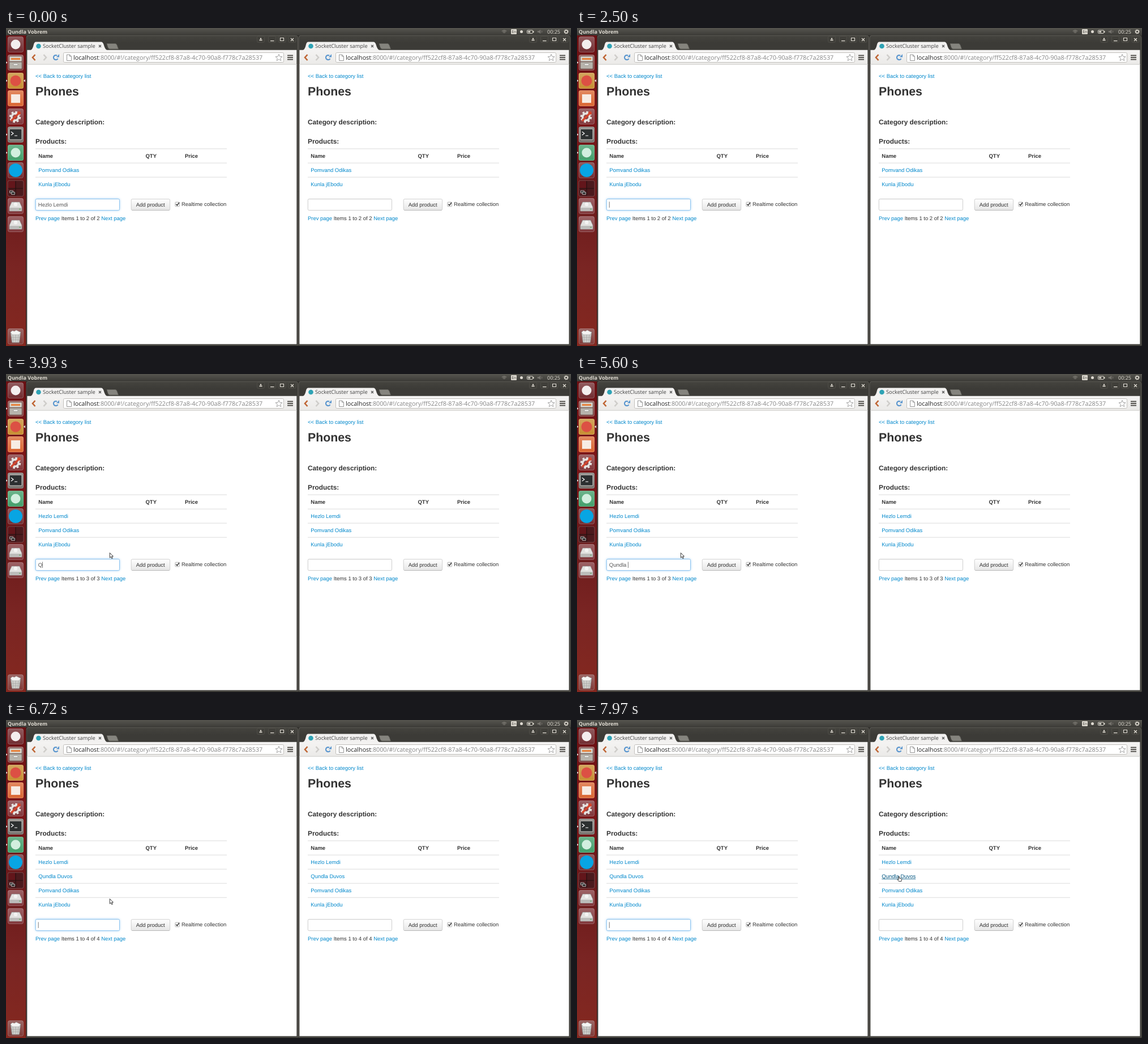
Write an HTML page with a canvas that moves like this. It is 998 px wide and 561 px high and loops after 8 s.

```html
<!DOCTYPE html>
<html lang="en">
<head>
<meta charset="utf-8">
<title>Realtime product list</title>
<style>
  html, body { margin: 0; width: 100%; height: 100%; overflow: hidden; background: #2f2e2a; }
  canvas { display: block; }
</style>
</head>
<body>
<canvas width="998" height="561"></canvas>
<script>
const ctx = document.querySelector('canvas').getContext('2d');
const LOOP = 8000, ROW = 25, BODY = 9.46;
const SANS = '"Liberation Sans", Arial, sans-serif';
const UI = '"Open Sans", "Noto Sans", sans-serif';
const LINK = '#0088cc', INK = '#333';
const FIRST = 'Hezlo Lemdi', SECOND = 'Qundla Duvos';
const BASE = ['Pomvand Odikas', 'Kunla jEbodu'];

// [time, text in the field]
const TYPING = [
  [0, FIRST], [2500, ''], [3930, 'Q'], [4100, 'Qu'], [4240, 'Qun'], [4410, 'Qunn'],
  [4840, 'Qun'], [4950, 'Qund'], [5060, 'Qundl'], [5160, 'Qundla'], [5600, 'Qundla '],
  [6010, 'Qundla D'], [6150, 'Qundla Du'], [6300, 'Qundla Duv'], [6390, 'Qundla Duvo'],
  [6480, SECOND], [6660, '']
];
const CARET_TOGGLES = [260, 860, 1450, 2050, 2500, 3130, 3730, 7260, 7860];
// [time, x, y]
const POINTER = [[2560, 183, 315], [7118, 183, 315], [7370, 416, 289.5],
                 [7496, 507, 279], [7622, 507, 279], [7958, 568, 276.5]];

function text(str, x, y, { size = BODY, color = INK, weight = '', family = SANS } = {}) {
  ctx.font = `${weight} ${size}px ${family}`;
  ctx.fillStyle = color;
  ctx.fillText(str, x, y);
  return x + ctx.measureText(str).width;
}
function rect(x, y, w, h, fill) {
  ctx.fillStyle = fill;
  ctx.fillRect(x, y, w, h);
}
function paint(fill, stroke, width = 1) {
  if (fill) { ctx.fillStyle = fill; ctx.fill(); }
  if (stroke) { ctx.strokeStyle = stroke; ctx.lineWidth = width; ctx.stroke(); }
}
function box(x, y, w, h, r, fill, stroke, width) {
  ctx.beginPath();
  ctx.roundRect(x, y, w, h, r);
  paint(fill, stroke, width);
}
function disc(x, y, r, fill, stroke, width) {
  ctx.beginPath();
  ctx.arc(x, y, r, 0, 7);
  paint(fill, stroke, width);
}
function path(d, fill, stroke, width, x = 0, y = 0) {
  ctx.save();
  ctx.translate(x, y);
  const p = new Path2D(d);
  if (fill) { ctx.fillStyle = fill; ctx.fill(p); }
  if (stroke) { ctx.strokeStyle = stroke; ctx.lineWidth = width; ctx.stroke(p); }
  ctx.restore();
}
function fade(y0, y1, ...colors) {
  const g = ctx.createLinearGradient(0, y0, 0, y1);
  colors.forEach((c, i) => g.addColorStop(i / (colors.length - 1), c));
  return g;
}
function gear(x, y, r, color, width) {
  ctx.setLineDash([r * .42, r * .365]);
  disc(x, y, r, null, color, width);
  ctx.setLineDash([]);
  disc(x, y, r * .72, null, color, width);
}

function topBar() {
  const grey = '#dfdbd2';
  rect(0, 0, 998, 13, fade(0, 13, '#56554f', '#3c3b37'));
  text('Qundla Vobrem', 3, 9.7, { size: 9, weight: 'bold', color: grey, family: UI });
  text('00:25', 956, 10, { size: 9, color: grey, family: UI });
  [2, 4, 6].forEach(r => {
    ctx.beginPath();
    ctx.arc(880, 10, r, -2.35, -.8);
    paint(null, '#8f8c85', 1);
  });
  box(892, 2, 10, 9, 1, grey);
  text('En', 893.3, 9.4, { size: 6.8, color: '#3c3b37', family: UI });
  disc(910.5, 6.5, 2.5, grey);
  box(920.5, 4, 10, 5.5, 1, null, grey, 1);
  rect(931, 5.5, 1.5, 2.5, grey);
  rect(922, 5.5, 4, 2.5, grey);
  path('M0 2h2l3-2v6l-3-2h-2zM7 1q2 2 0 4', '#77756f', '#77756f', .6, 939, 3.5);
  gear(989.5, 6.5, 3.4, grey, 1.3);
}

function tile(y, color) {
  box(3, y - 14, 28, 28, 3, color);
  box(3.5, y - 13.5, 27, 27, 3, fade(y - 14, y + 14, '#ffffff40', '#ffffff08'), '#ffffff38', 1);
}
function drive(y) {
  tile(y, '#7d3034');
  path('M6 2l4-9h14l4 9v7h-22z', '#e2e2e0', '#8a8684', .7, 0, y);
  rect(6.5, y + 3, 21, 5.5, '#bcbcba');
  disc(17, y - 3, 3.2, '#f4f4f3');
  rect(23, y + 5, 3, 1, '#5a5');
}
function launcher() {
  rect(0, 13, 35, 548, fade(13, 561, '#6a1013', '#7c1618', '#6a191a', '#7a2523', '#84281f'));
  rect(35, 13, 1, 548, '#3a2220');

  tile(29, '#6d262a');
  disc(17, 29, 8.5, '#f3eeee');

  tile(61, '#7d3a38');
  box(6, 50, 22, 9, 1, '#d8d4cc', '#6e6a64', .7);
  box(6, 60, 22, 12, 1, '#b8b4ac', '#6e6a64', .7);
  rect(9, 53, 16, 3, '#e7833c');
  box(13, 63, 8, 3, 1, '#f4f3ef', '#777', .6);

  tile(93, '#c58a2a');
  disc(17, 93, 9.5, '#dc5044');

  tile(124, '#d9622c');
  box(9, 117, 16, 15, 0, '#f7ece4');

  tile(156, '#7d3034');
  gear(16, 157, 8.5, '#e6e4e1', 3.5);
  path('M9 164l12-12', null, '#d2452c', 3.5);
  disc(23, 150, 3, '#d2452c');

  tile(188, '#6f6b66');
  box(6, 178, 22, 19, 1, '#2c2f30', '#d4d2ce', 1);
  path('M9 183l4 3-4 3M15 190h5', null, '#fff', 1.2);

  tile(220, '#3c9c66');
  disc(17, 220, 8.5, '#d2efdf');

  tile(251, '#6d262a');
  disc(17, 251, 12, '#08a5e3');

  box(3, 269, 28, 28, 3, '#4b1a1d', '#78494a', 1);
  rect(4, 270, 13, 13, '#63161b');
  path('M17 270v26M4 283h26', null, '#241011', 1.2);
  box(6.5, 287, 6, 4, 0, '#333', '#ccc', .8);
  box(9.5, 289.5, 6, 4, 0, '#333', '#ccc', .8);

  drive(314);
  drive(346);

  tile(544, '#7b3431');
  path('M8 -8h18l-2.5 19h-13z', '#cfcfcc', '#777', .7, 0, 544);
  path('M12 -3l1 13M17 -3v13M22 -3l-1 13M10 2h14M11 6h12', null, '#a3a3a0', .7, 0, 544);
  path('M8 -7l3-3 4 1 3-2 4 2 4 2-3 4h-12z', '#f4f4f2', '#999', .5, 0, 544);

  [61, 93, 188, 220].forEach(y => path('M0 -2l2.5 2-2.5 2z', '#e8e4e0', null, 0, 0, y));
  path('M34 -2.5l-3 2.5 3 2.5z', '#e8e4e0', null, 0, 0, 93);
}

function windowFrame() {
  box(36, 13.3, 479.5, 546.2, [4, 4, 0, 0], fade(13, 39, '#45443f', '#3c3b37', '#3c3b37'), '#65645e', .8);
  [450, 470, 487.5, 505.5].forEach(x =>
    box(x - 6.5, 14.5, 13, 11, 2, '#403f3a', '#55544e', .7));
  const light = '#dfdbd2';
  disc(450, 18.8, 1.3, light);
  rect(447.5, 20.5, 5, 1.8, light);
  rect(467, 22, 6.5, 1.3, light);
  box(484.5, 17.5, 6, 5, 0, null, light, 1.2);
  path('M503 18l5 5m0-5l-5 5', null, light, 1.3);

  path('M43 39.5Q47 38.5 49 29Q50 24.4 53 24.4H168Q171 24.4 172.5 29Q175 38.5 179 39.5z', '#f2f1f0');
  path('M178 27.5H193Q195 27.5 196 30L198.5 37H183Q181 37 180 34z', '#85847e', '#5e5d57', .8);
  disc(57.5, 32, 4.3, '#2fa3b5');
  text('SocketCluster sample', 65, 35.2, { size: 9.28, color: '#444', family: UI });
  path('M164 30l4 4m0-4l-4 4', null, '#555', 1.2);

  rect(37.4, 38.8, 476, 26, fade(39, 64, '#f4f3f2', '#ebeae8'));
  rect(37.4, 64, 476, 493.7, '#fff');
  rect(37.4, 63.8, 476, .8, '#c4c2be');
  path('M51.5 47l-4.5 5 4.5 5', null, '#bf6534', 2.6);
  path('M66.5 47l4.5 5-4.5 5', null, '#cfcdca', 2.6);
  ctx.beginPath();
  ctx.arc(88, 52, 4, .5, 5.3);
  paint(null, '#5a96cf', 2.2);
  path('M89 51.5h5v-5.5z', '#5a96cf');
  box(101.5, 43.5, 389, 17, 2, '#fff', '#c1bfbb', 1);
  path('M107.5 47h5l3 3v7.5h-8zM112.5 47v3h3', '#fff', '#8a8a8a', .9);
  const url = { size: 10.75, family: UI };
  const end = text('localhost', 119, 55.7, { ...url, color: '#222' });
  text(':8000/#!/category/ff522cf8-87a8-4c70-90a8-f778c7a28537', end, 55.7, { ...url, color: '#858585' });
  path('M0 -6l1.7 4 4.3 .3-3.3 2.8 1.1 4.2-3.8-2.3-3.8 2.3 1.1-4.2-3.3-2.8 4.3-.3z',
       '#fff', '#9a9a9a', .9, 482, 52.3);
  [47.5, 51, 54.5].forEach(y => rect(497, y, 10, 2, '#55534f'));
}

function field(y, focused, value, caret) {
  ctx.save();
  if (focused) {
    ctx.shadowColor = 'rgba(82,168,236,.6)';
    ctx.shadowBlur = 4;
  }
  box(52.3, y, 148.2, 20, 2, '#fff');
  ctx.restore();
  box(52.3, y, 148.2, 20, 2, null, focused ? '#82bfef' : '#c8c8c8', .9);
  rect(53, y + .7, 147, .6, '#0000000d');
  const end = text(value, 56.8, y + 13.3, { color: '#555' });
  if (caret) rect(end, y + 4.8, .6, 10.6, '#222');
}

function page(rows, live, value, caret, hover) {
  const bold = { weight: 'bold' };
  text('<< Back to category list', 52, 88.3, { color: LINK });
  text('Phones', 52, 119, { size: 21.29, weight: 'bold' });
  text('Category description:', 52, 170, { size: 11.83, weight: 'bold' });
  text('Products:', 52, 204, { size: 11.83, weight: 'bold' });
  text('Name', 57.3, 229.2, bold);
  text('QTY', 246.5, 229.2, bold);
  text('Price', 316, 229.2, bold);
  rect(52, 212.6, 338, .9, '#d8d8d8');
  rows.forEach((name, i) => {
    const y = 254.2 + i * ROW, over = hover && name === SECOND;
    rect(52, 237.7 + i * ROW, 338, .9, '#d8d8d8');
    const end = text(name, 57.3, y, { color: over ? '#005580' : LINK });
    if (over) rect(57.3, y + 1, end - 57.3, .8, '#005580');
  });

  const y = 301.6 + (rows.length - 2) * ROW;
  field(y, live, value, caret);
  box(221.2, y + .2, 68.4, 19.7, 2, fade(y, y + 20, '#fff', '#e6e6e6'), '#c4c4c4', .8);
  rect(222.5, y + 19.5, 66, .8, '#b0b0b0');
  text('Add product', 229.7, y + 13.5);
  box(298.9, y + 5.6, 7.6, 7.6, 1, '#f8f8f8', '#a0a0a0', .8);
  path('M300.3 9.2l2 2.2 3.5-5', null, '#333', 1.4, 0, y);
  text('Realtime collection', 310, y + 12.8);
  let x = text('Prev page', 52, y + 37.3, { color: LINK });
  x = text(` Items 1 to ${rows.length} of ${rows.length} `, x, y + 37.3);
  text('Next page', x, y + 37.3, { color: LINK });
}

function pointerAt(t) {
  if (t < POINTER[0][0]) return null;
  const stepped = Math.floor((t - 7160) / 42) * 42 + 7160;
  const time = Math.max(stepped, POINTER[0][0]);
  const i = POINTER.findIndex(k => k[0] > time);
  if (i < 0) return POINTER.at(-1).slice(1);
  const [t0, x0, y0] = POINTER[i - 1], [t1, x1, y1] = POINTER[i];
  const u = (time - t0) / (t1 - t0);
  return [x0 + (x1 - x0) * u, y0 + (y1 - y0) * u];
}
function drawPointer([x, y], hand) {
  if (hand) {
    path('M0 0q1-1 1.8 0v2.8l3 .7q1 .3 .8 1.7l-.8 3h-4.3l-2.5-3.2q0-1.4 2 0z',
         '#fff', '#222', .9, x, y);
  } else {
    path('M.3 .5v8.7l2-1.9 1.5 3.2 1.5-.7-1.5-3.1h2.6z', '#fff', '#222', .9, x, y);
  }
}

function draw(t) {
  const value = TYPING.findLast(k => k[0] <= t)[1];
  const caret = CARET_TOGGLES.filter(k => k <= t).length % 2 === 1;
  const rows = [...BASE];
  if (t >= 6720) rows.unshift(SECOND);
  if (t >= 2560) rows.unshift(FIRST);
  const pointer = pointerAt(t);
  const hover = pointer !== null && pointer[0] >= 538;

  rect(0, 0, 998, 561, '#2f2e2a');
  for (const shift of [0, 481]) {
    ctx.save();
    ctx.translate(shift, 0);
    windowFrame();
    page(rows, !shift, shift ? '' : value, !shift && caret, shift && hover);
    ctx.restore();
  }
  launcher();
  topBar();
  if (pointer) drawPointer(pointer, hover);
}

ctx.textRendering = 'geometricPrecision';
function tick() {
  draw(performance.now() % LOOP);
  requestAnimationFrame(tick);
}
tick();
</script>
</body>
</html>
```
